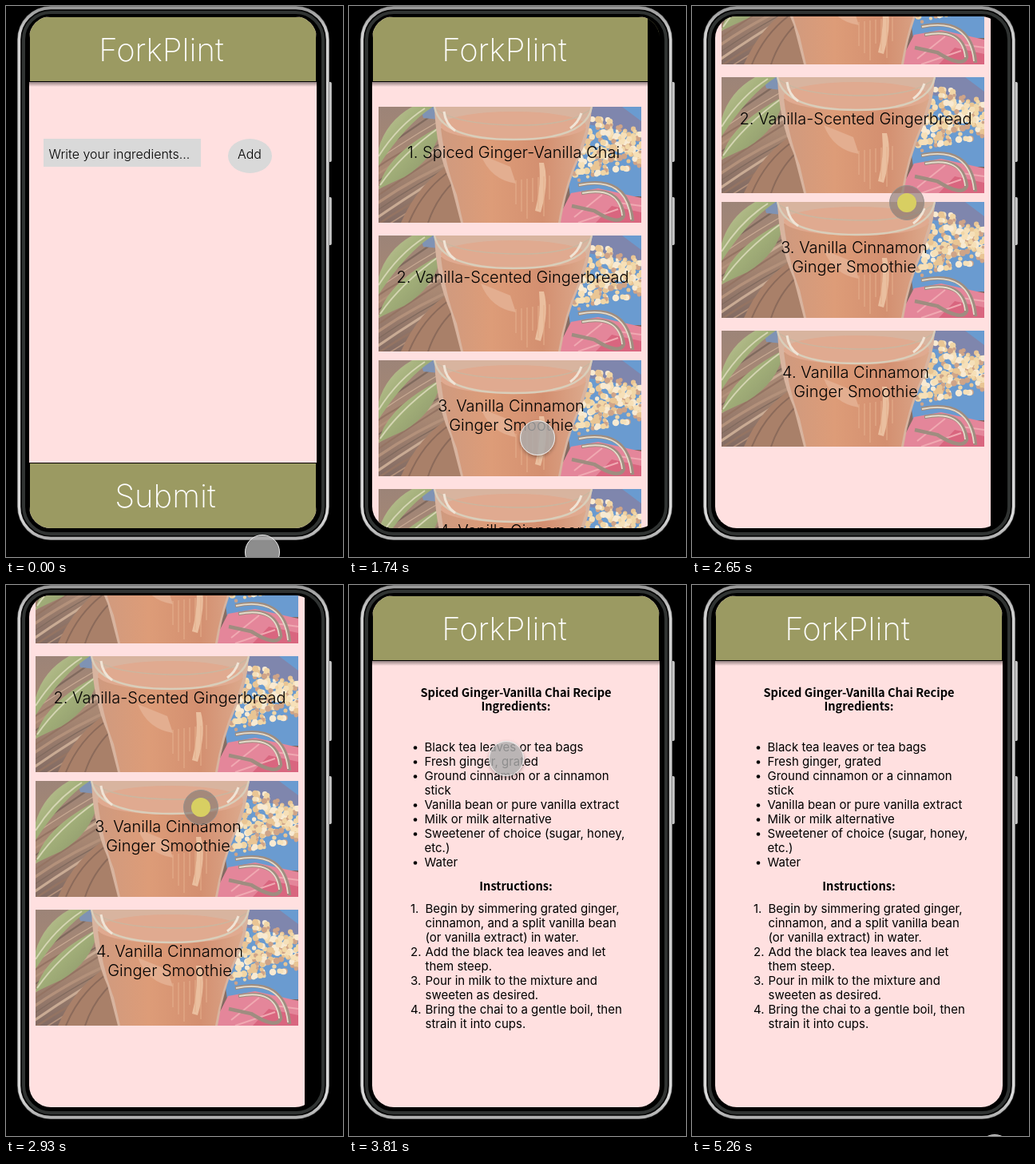
These frames come from a looping animation (422x689 px, 5.33 s). An HTML page:

```html
<!DOCTYPE html>
<html lang="en">
<head>
<meta charset="utf-8">
<title>Recipe app prototype</title>
<style>
  html, body { margin: 0; width: 100%; height: 100%; overflow: hidden; background: #000; }
  svg { display: block; width: 422px; height: 689px; font-family: Inter, sans-serif; }
  .big { font-size: 40px; font-weight: 200; fill: #fff; text-anchor: middle; }
  .field { font-size: 16px; font-weight: 300; }
  .card { font-size: 20px; font-weight: 300; text-anchor: middle; }
  .head { font: 700 14.6px "Noto Sans CJK KR", "Noto Sans CJK JP", "Noto Sans CJK SC", "Noto Sans", sans-serif; text-anchor: middle; }
  .body { font-size: 15px; }
</style>
</head>
<body>
<svg viewBox="0 0 422 689">
  <defs>
    <linearGradient id="metal" x2="0" y2="1">
      <stop stop-color="#9a9a9a"/><stop offset=".05" stop-color="#d2d2d2"/>
      <stop offset=".5" stop-color="#c4c4c4"/><stop offset=".96" stop-color="#dadada"/>
      <stop offset="1" stop-color="#b0b0b0"/>
    </linearGradient>
    <linearGradient id="button">
      <stop stop-color="#777"/><stop offset=".5" stop-color="#e2e2e2"/><stop offset="1" stop-color="#999"/>
    </linearGradient>
    <linearGradient id="shade" x2="0" y2="1">
      <stop stop-opacity=".42"/><stop offset="1" stop-opacity="0"/>
    </linearGradient>
    <linearGradient id="husk" x2=".3" y2="1">
      <stop stop-color="#9c8478"/><stop offset=".5" stop-color="#a98873"/><stop offset="1" stop-color="#7c6660"/>
    </linearGradient>
    <linearGradient id="leaf" x2="1" y2="1">
      <stop stop-color="#c3c69a"/><stop offset=".45" stop-color="#a2af79"/><stop offset="1" stop-color="#858d65"/>
    </linearGradient>
    <linearGradient id="tea">
      <stop stop-color="#cf9a7f"/><stop offset=".35" stop-color="#dd9c78"/>
      <stop offset=".7" stop-color="#d38f70"/><stop offset="1" stop-color="#dca98c"/>
    </linearGradient>
    <filter id="drop" x="-30%" y="-30%" width="160%" height="170%">
      <feDropShadow dx="0" dy="2" stdDeviation="2" flood-opacity=".4"/>
    </filter>
    <clipPath id="screen"><rect x="29" y="13" width="360" height="640" rx="27"/></clipPath>
    <clipPath id="frame"><rect width="329" height="145"/></clipPath>
    <g id="header">
      <rect x="29" y="95" width="360" height="6" fill="url(#shade)"/>
      <rect x="29.5" y="13.5" width="359" height="81" fill="#9b9a62" stroke="#000"/>
      <text class="big" x="194.5" y="69">ForkPlint</text>
    </g>
    <g id="photo" clip-path="url(#frame)"></g>
  </defs>

  <rect width="422" height="689"/>
  <rect x="402" y="95" width="6" height="100" rx="2" fill="url(#button)"/>
  <rect x="402" y="239" width="6" height="60" rx="2" fill="url(#button)"/>
  <rect x="14" y="0" width="391" height="668" rx="42" fill="#6a6a6a"/>
  <rect x="16.5" y="2.5" width="386" height="663" rx="39.5" fill="#050505" stroke="url(#metal)" stroke-width="3.4"/>
  <rect x="22" y="8" width="375" height="652" rx="34" fill="#000" stroke="#303332" stroke-width="4"/>

  <g clip-path="url(#screen)">
    <g id="entry">
      <rect x="29" y="13" width="360" height="640" fill="#ffe0e0"/>
      <use href="#header"/>
      <rect x="47" y="166" width="197" height="35" fill="#d9d9d9"/>
      <text class="field" x="53.5" y="191">Write your ingredients...</text>
      <ellipse cx="305.5" cy="187.5" rx="27.5" ry="21.5" fill="#d9d9d9"/>
      <text class="field" x="305" y="191" text-anchor="middle">Add</text>
      <rect x="29.5" y="571.5" width="359" height="82" fill="#9b9a62" stroke="#000"/>
      <text class="big" x="199.5" y="627">Submit</text>
    </g>
    <g id="list">
      <rect x="29" y="13" width="345" height="640" fill="#ffe0e0"/>
      <g id="page"><use href="#header"/></g>
      <rect x="374" y="13" width="16" height="641"/>
    </g>
    <g id="recipe">
      <rect x="29" y="13" width="360" height="640" fill="#ffe0e0"/>
      <use href="#header"/>
    </g>
  </g>

  <g id="cursor">
    <circle id="disc" r="21.5" stroke-width="1"/>
    <circle id="dot" r="12" fill="#d8cf62"/>
  </g>
</svg>
<script>
const $ = id => document.getElementById(id);
const add = (id, markup) => $(id).insertAdjacentHTML('beforeend', markup);
const text = (cls, x, y, s) => `<text class="${cls}" x="${x}" y="${y}">${s}</text>`;
const path = (d, fill) => `<path d="${d}" fill="${fill}"/>`;
const line = (d, color, width) => `<path d="${d}" fill="none" stroke="${color}" stroke-width="${width}"/>`;

let seed = 11;
const random = () => (seed = seed * 16807 % 2147483647) / 2147483647;

function drawPhoto() {
  let s = path('M0 0H329V145H0Z', 'url(#husk)');
  // husks and leaves
  for (let i = 0; i < 18; i++) {
    const y = 60 + i * 9;
    s += line(`M-5 ${y}Q45 ${y - 35} 105 ${y - 75 + random() * 25}`,
      ['#806a5e', '#c9ab94', '#947463', '#b3917b'][i % 4], 1 + random() * 3);
  }
  s += path('M52 0H84L76 16L56 14Z', '#7f93b4')
    + path('M0 52Q10 18 42 0H68Q34 22 0 74Z', 'url(#leaf)')
    + path('M0 103Q8 60 78 24Q72 64 32 88Q14 96 0 103Z', 'url(#leaf)')
    + line('M2 98Q28 60 76 26M0 62Q24 24 58 2', '#d5d5b3', 2)
    + path('M28 145Q50 95 92 70L104 145Z', '#a98069')
    + line('M38 145Q55 104 90 80M62 145Q72 115 94 94', '#8b6a5a', 2);
  // sky, grain stalks and cloth
  s += path('M225 0H329V112H240Z', '#6a9bd0') + path('M250 0H305L329 18V34L262 22Z', '#7f86ad');
  for (let i = 0; i < 210; i++) {
    const along = random(), stalk = i % 4;
    const x = 244 + along * 85, y = 12 + stalk * 24 + along * (28 - stalk * 16) + (random() - .5) * 20;
    s += `<circle cx="${x}" cy="${y}" r="${2 + random() * 2.4}" fill="${['#f6e0b8', '#e9c594', '#f8ead2', '#cfa488', '#f1d6a6'][i % 5]}"/>`;
  }
  s += path('M222 145L241 108L275 102L329 114V145Z', '#e4869a')
    + path('M272 145L292 124L329 132V145Z', '#d9667f')
    + line('M245 138L280 110M300 120L329 124M250 145L300 128', '#f0a9b2', 2);
  // glass cup
  s += path('M70 0Q72 55 90 95L103 145H228Q235 100 252 62Q266 32 267 0Z', '#d8b49f')
    + path('M78 27Q84 75 98 110L106 145H225Q233 98 249 62L260 27Z', 'url(#tea)')
    + '<ellipse cx="169" cy="24" rx="91" ry="18" fill="#e0aa90"/>'
    + line('M70 0Q78 41 169 41T267 0', '#d9ceba', 2.5)
    + line('M73 4Q100 22 169 23T264 4', '#c9b7a0', 1.5)
    + line('M82 6Q84 22 96 30M254 8Q250 20 240 27', '#f0e4d6', 3)
    + path('M128 60L165 75L172 96Q140 91 128 60Z', '#e3ae90')
    + path('M207 70Q214 95 203 132L196 130Q204 100 201 70Z', '#eabf9f');
  for (let i = 0; i < 7; i++)
    s += line(`M${172 + i * 7} ${92 - i}v${30 + i % 3 * 10}`, '#e5b08d', 1);
  s += line('M250 98Q312 84 318 143M254 108Q302 98 307 136Q302 150 270 130L242 124', '#9f8d80', 4.5)
    + line('M251 98Q310 86 316 141M255 108Q301 99 305 136', '#e6dccb', 1.8);
  add('photo', s);
}

function drawCards() {
  const smoothie = ['Vanilla Cinnamon', 'Ginger Smoothie'];
  [
    [126, 206, 64, ['Spiced Ginger-Vanilla Chai']],
    [287, 205, 59, ['Vanilla-Scented Gingerbread']],
    [443, 203, 64, smoothie],
    [604, 205, 59, smoothie]
  ].forEach(([y, x, base, lines], n) => add('page',
    `<use href="#photo" x="37" y="${y}"/>` + lines.map((s, i) =>
      text('card', x, y + base + i * 24, (i ? '' : n + 1 + '. ') + s)).join('')));
}

// each line break inside an item is marked with |
function drawItems(items, x, y, marker) {
  items.forEach((item, n) => {
    add('recipe', marker(n, y));
    item.split('|').forEach(s => {
      add('recipe', text('body', x, y, s));
      y += 18;
    });
  });
}

function drawRecipe() {
  add('recipe', text('head', 209, 140, 'Spiced Ginger-Vanilla Chai Recipe')
    + text('head', 209, 157, 'Ingredients:') + text('head', 209, 382, 'Instructions:'));
  drawItems(['Black tea leaves or tea bags', 'Fresh ginger, grated', 'Ground cinnamon or a cinnamon|stick',
    'Vanilla bean or pure vanilla extract', 'Milk or milk alternative',
    'Sweetener of choice (sugar, honey,|etc.)', 'Water'], 94.5, 208,
    (n, y) => `<circle cx="83" cy="${y - 4.5}" r="2.3"/>`);
  drawItems(['Begin by simmering grated ginger,|cinnamon, and a split vanilla bean|(or vanilla extract) in water.',
    'Add the black tea leaves and let|them steep.', 'Pour in milk to the mixture and|sweeten as desired.',
    'Bring the chai to a gentle boil, then|strain it into cups.'], 95.5, 410,
    (n, y) => text('body', 77, y, n + 1 + '.'));
}

// pointer route: step, x, y
const route = [
  [0, 321, 683], [3, 262, 520], [5, 213, 350], [8, 255, 215], [11, 302, 191], [13, 303, 190],
  [16, 275, 456], [19, 205, 608], [21, 200, 612], [24, 190, 618], [25, 236, 540], [28, 258, 340],
  [30, 264, 380], [32, 271, 452], [33, 271, 444], [38, 269, 246], [40, 266, 232], [42, 244, 278],
  [46, 237, 381], [48, 233, 476], [50, 222, 400], [53, 198, 220], [55, 197, 217], [56, 202, 240],
  [60, 222, 612], [62, 262, 560], [64, 335, 330], [67, 396, 60], [68, 400, 38], [70, 385, 230],
  [72, 352, 624], [73, 350, 630], [76, 379, 709]
];
const presses = [[12, 13], [20, 21], [33, 40], [42, 48], [53, 53]];
const LOOP = 5330, STEPS = 77, MAX_SCROLL = 198;

function pointer(step) {
  const i = Math.max(1, route.findIndex(k => k[0] >= step));
  const a = route[i - 1], b = route[i], span = b[0] - a[0], u = (step - a[0]) / span;
  const slope = (n, axis) => {
    const p = route[Math.max(0, n - 1)], k = route[n], q = route[Math.min(route.length - 1, n + 1)];
    return (k[axis] - p[axis]) * (q[axis] - k[axis]) <= 0 ? 0 : (q[axis] - p[axis]) / (q[0] - p[0]);
  };
  return [1, 2].map(axis =>
    a[axis] + (b[axis] - a[axis]) * u * u * (3 - 2 * u)
    + span * u * (1 - u) * ((1 - u) * slope(i - 1, axis) - u * slope(i, axis)));
}

function scrollAt(step, y) {
  if (step < 33 || step > 48) return 0;
  if (step > 38 && step < 42) return MAX_SCROLL;
  return Math.min(MAX_SCROLL, Math.max(0, (step < 42 ? 444 : 476) - y));
}

function show(now) {
  const step = Math.min(STEPS - 1, Math.floor(now % LOOP / LOOP * STEPS + .05));
  const [x, y] = pointer(step);
  const scene = step < 22 ? 'entry' : step < 54 ? 'list' : 'recipe';
  for (const id of ['entry', 'list', 'recipe']) $(id).style.display = id === scene ? '' : 'none';
  $('page').setAttribute('transform', `translate(0 ${-scrollAt(step, y)})`);
  $('cursor').setAttribute('transform', `translate(${x} ${y})`);
  const down = presses.some(([from, to]) => step >= from && step <= to);
  $('dot').style.display = down ? '' : 'none';
  $('disc').setAttribute('fill', down ? 'rgba(125,115,110,.6)' : 'rgba(179,179,179,.75)');
  $('disc').setAttribute('stroke', down ? '#9a928c' : '#eee');
  $('disc').setAttribute('filter', down ? 'none' : 'url(#drop)');
}

drawPhoto();
drawCards();
drawRecipe();
const start = performance.now();
(function tick() {
  show(performance.now() - start);
  requestAnimationFrame(tick);
})();
</script>
</body>
</html>
```
